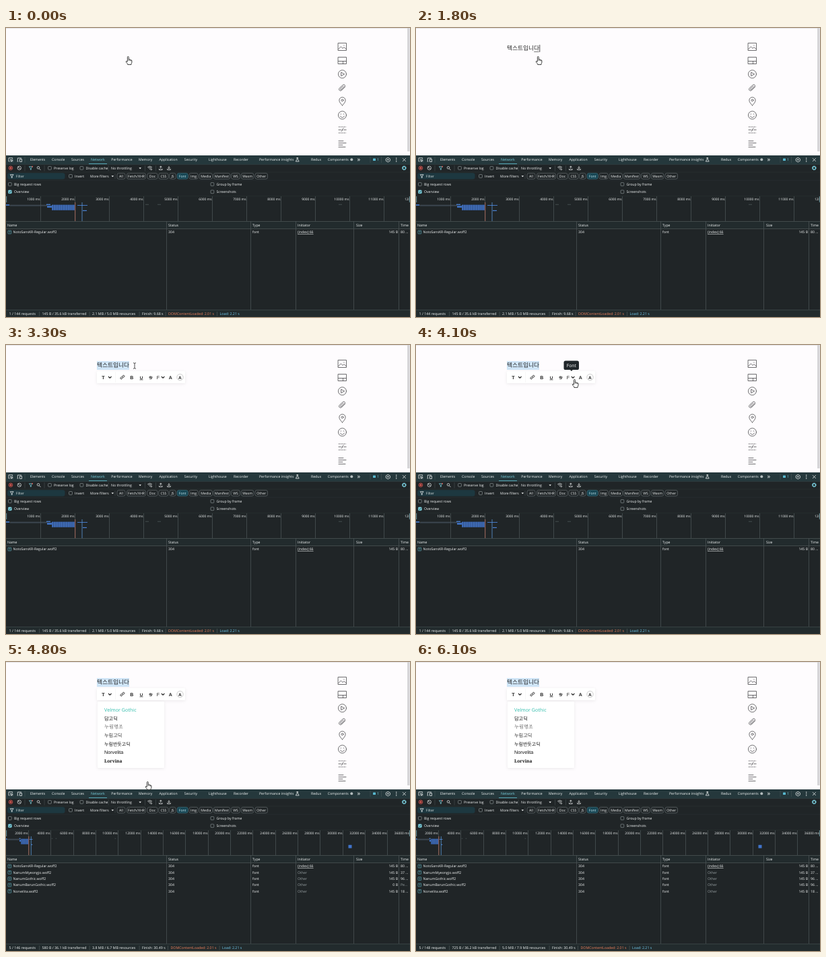
These frames come from a looping animation (600x431 px, 7 s). An HTML page:

```html
<!DOCTYPE html>
<html lang="ko">
<head>
<meta charset="utf-8">
<title>Font menu and network panel</title>
<style>
html, body { margin: 0; width: 100%; height: 100%; overflow: hidden; background: #fefcfe; }
svg { display: block; width: 100vw; height: 100vh; }
text { font-family: "Open Sans", "Noto Sans", sans-serif; font-size: 5.2px; fill: #f3f6f6; text-rendering: geometricPrecision; white-space: pre; }
.kr { font-family: "Noto Sans CJK KR", "Noto Sans CJK", sans-serif; }
.krs { font-family: "Noto Serif CJK KR", "Noto Sans CJK KR", serif; }
.arial { font-family: "Liberation Sans", sans-serif; }
.serif { font-family: "Noto Serif", serif; }
.card { filter: drop-shadow(0 1px 2px rgba(0, 0, 0, .08)); }
</style>
</head>
<body>
<svg id="stage" viewBox="0 0 600 431" preserveAspectRatio="none"></svg>
<script>
const NS = 'http://www.w3.org/2000/svg';
const stage = document.getElementById('stage');

function add(parent, tag, attrs, content) {
  const el = document.createElementNS(NS, tag);
  for (const k in attrs) el.setAttribute(k, attrs[k]);
  if (content !== undefined) el.textContent = content;
  parent.appendChild(el);
  return el;
}
const group = (p = stage, attrs = {}) => add(p, 'g', attrs);
const rect = (p, x, y, width, height, fill, more) =>
  add(p, 'rect', { x, y, width, height, fill, ...more });
const text = (p, x, y, s, more) => add(p, 'text', { x, y, ...more }, s);
const line = (p, d, stroke, w = 0.8, more) =>
  add(p, 'path', { d, stroke, 'stroke-width': w, fill: 'none', ...more });
const circle = (p, cx, cy, r, more) => add(p, 'circle', { cx, cy, r, fill: 'none', ...more });
const show = (el, on) => el.setAttribute('visibility', on ? 'visible' : 'hidden');

const INK = '#f3f6f6', DIM = '#98a1a3', TEAL = '#7cd3e2', RULE = '#495254', GRAY = '#545457';

// Editor page
rect(stage, 0, 0, 600, 190, '#fefcfe');
rect(stage, 0, 0, 596, 1, '#e6e4e7');
rect(stage, 596, 0, 4, 184, '#f1f0f2');
rect(stage, 596, 0, 3.4, 184, '#d6d5d8');

const side = group(stage, { stroke: GRAY, 'stroke-width': 0.85, fill: 'none', 'stroke-linejoin': 'round', 'stroke-linecap': 'round' });
[
  'M493.5 22.5H505.5V33.5H493.5ZM493.8 31.5L497.4 27.8L500 30.4L502 28.6L505.2 31.5M501.7 25.7h.5',
  'M493.5 43.5H505.5V53.5H493.5ZM493.5 49.5H505.5M500.5 49.5V53.5',
  'M498 66.2L502.6 68.8L498 71.4Z',
  'M503.8 87.6L498.4 93C496.4 95 493.1 92 495.2 89.8L500.5 84.8C502 83.4 504.6 85.5 503 87.3L498.2 91.8C497.2 92.7 495.9 91.5 496.8 90.5L501.2 86.4',
  'M499.5 115.6C496.2 111.8 494.9 110 494.9 107.8A4.6 4.6 0 0 1 504.1 107.8C504.1 110 502.8 111.8 499.5 115.6Z',
  'M496.7 131.5C497.7 134.2 501.3 134.2 502.3 131.5M497.3 128.2v.4M501.7 128.2v.4',
  'M494 151.9H497.4M501.8 151.9H505.2M498 154.2L500.2 151.9H498.8L501.4 149.4',
  'M494 168.5H501M494 171.5H505M494 174.5H500M494 177.5H504'
].forEach(d => add(side, 'path', { d }));
circle(side, 499.5, 68.8, 6);
circle(side, 499.5, 107.8, 1.5);
circle(side, 499.5, 130, 6);
line(side, 'M494 147.5H505.5M494 156.5H505.5', GRAY, 0.9, { 'stroke-dasharray': '1.6 1.2', 'stroke-linecap': 'butt' });

// Typed line
const selection = rect(stage, 135, 24, 0, 13, '#cfe5f7');
const typed = text(stage, 135, 33.4, '', { class: 'kr', style: 'font-size:8.7px;fill:#222' });
const under = rect(stage, 0, 35.2, 7.4, 0.7, '#444');
const caret = rect(stage, 0, 25, 0.8, 10.8, '#222');

// Format bar
const bar = group();
rect(bar, 135, 39, 131, 18, '#fff', { rx: 1.5, class: 'card' });
rect(bar, 162.3, 40, 0.5, 16, '#eeeef0');
const mark = (x, s, more = '') => text(bar, x, 50.5, s, {
  'text-anchor': 'middle', class: 'arial', style: 'font-size:7px;font-weight:700;fill:#222;' + more
});
mark(144.5, 'T');
mark(186.8, 'B');
mark(201, 'U', 'font-size:6.2px');
mark(215, 'S', 'font-size:6.4px');
mark(226, 'F', 'font-weight:400');
mark(244.2, 'A');
mark(258.5, 'A', 'font-size:6.6px');
circle(bar, 258.5, 48.1, 4.7, { stroke: '#999', 'stroke-width': 0.5 });
line(bar, 'M152 47L154.3 49.2L156.6 47M230.8 47L233.1 49.2L235.4 47', '#222', 1.1);
line(bar, 'M198.5 51.9H203.5M212 48.1H218', '#222', 0.7);
line(bar, 'M172.4 47L173.8 45.5A1.3 1.3 0 0 1 175.6 47.3L174.2 48.8M173.4 49L172 50.5A1.3 1.3 0 0 1 170.2 48.7L171.6 47.2M171.9 49L173.9 47', '#222', 1);

const tip = group();
rect(tip, 219.5, 23.6, 22.5, 13.4, '#20262a', { rx: 2.6 });
add(tip, 'path', { d: 'M228.8 36.8H233L230.9 39Z', fill: '#20262a' });
text(tip, 230.8, 32.6, 'Font', { 'text-anchor': 'middle', style: 'font-size:6.8px;fill:#fff' });

const menu = group();
rect(menu, 136, 59, 99, 99, '#fff', { rx: 1.5, class: 'card' });
[
  ['Velmor Gothic', '', 'font-size:7.2px;font-weight:500;fill:#2fbcab'],
  ['담고딕', 'kr', 'font-size:7.2px;font-weight:500'],
  ['누림명조', 'krs', 'font-size:7.2px;fill:#444'],
  ['누림고딕', 'kr', 'font-size:7.2px;fill:#333'],
  ['누림반듯고딕', 'kr', 'font-size:7px;font-weight:500'],
  ['Norvelita', 'arial', 'font-size:7.2px'],
  ['Lorvina', 'serif', 'font-size:6.6px;font-weight:600']
].forEach(([s, c, style], i) => text(menu, 146, 74.3 + i * 12.55, s, { class: c, style: 'fill:#111;' + style }));

// Network panel
rect(stage, 0, 190, 600, 241, '#202527');
rect(stage, 0, 190, 600, 13, '#25383c');
rect(stage, 0, 203, 600, 0.6, '#36464a');

const panel = group();
const tabs = {
  Elements: 36, Console: 68, Sources: 97, Network: 126, Performance: 156.3, Memory: 197, Application: 227.5,
  Security: 264.8, Lighthouse: 301, Recorder: 338, 'Performance insights': 376, Redux: 453, Components: 477.7
};
for (const s in tabs) text(panel, tabs[s], 198.3, s, s === 'Network' ? { style: `fill:${TEAL}` } : {});
rect(panel, 123, 202, 27, 1, '#56a9b7');
circle(panel, 513.3, 196.3, 2, { style: 'fill:#b4bdbe' });
text(panel, 521.5, 199.2, '»', { style: 'font-size:9.5px' });
rect(panel, 545, 194.6, 4, 3.4, '#58b8cf', { rx: 0.5 });
text(panel, 551, 198.2, '1', { style: `fill:${TEAL}` });

const icon = (d, color = INK, w = 0.75) => line(panel, d, color, w);
icon('M5.5 199H4V193.8H9.6V195.4M6.6 196L10.3 197.3L8.6 198L10 199.5M6.6 196L7.7 199.6L8.6 198');
icon('M18.5 199H16.5M17.3 198.5V194H23M20.5 195.5H23.5V199.4H20.5Z');
icon('M431.5 193.6H434M432.1 193.6V196L430.3 199H435.2L433.4 196V193.6');
icon('M567.3 193.3L570.3 195V198.2L567.3 199.9L564.3 198.2V195Z');
circle(panel, 567.3, 196.6, 1, { style: `fill:${INK}` });
[194.2, 196.6, 199].forEach(y => circle(panel, 579.7, y, 0.7, { style: `fill:${INK}` }));
icon('M589 194.2L593.8 199M593.8 194.2L589 199');
icon('M28 192V201M541 192V201M557.5 192V201M28 205V213.5M57 205V213.5M152.2 205V213.5M206.5 205V213.5M222.5 205V213.5M162 217V225', '#4c595b', 0.5);

circle(panel, 7, 208.8, 2.8, { stroke: '#ee5a52', 'stroke-width': 0.8 });
rect(panel, 5.7, 207.5, 2.6, 2.6, '#ee5a52');
circle(panel, 19.8, 208.8, 2.7, { stroke: INK, 'stroke-width': 0.7 });
icon('M17.9 206.9L21.7 210.7');
const funnel = (x, y, c) => icon(`M${x - 2.4} ${y - 2.2}H${x + 2.4}L${x + .5} ${y + .3}V${y + 2.4}H${x - .5}V${y + .3}Z`, c);
funnel(36.8, 208.9, TEAL);
circle(panel, 39.2, 206.6, 0.9, { style: 'fill:#ee5a52' });
circle(panel, 48, 208.3, 1.8, { stroke: INK, 'stroke-width': 0.7 });
icon('M49.3 209.7L51.5 211.9');

function check(x, y, s, on) {
  rect(panel, x, y - 2.4, 4.8, 4.8, on ? TEAL : 'none', { rx: 0.9, stroke: on ? TEAL : DIM, 'stroke-width': 0.6 });
  if (on) icon(`M${x + 1} ${y}L${x + 2.1} ${y + 1.2}L${x + 4} ${y - 1.2}`, '#202526', 0.8);
  text(panel, x + 8.4, y + 2, s);
}
check(62.6, 208.9, 'Preserve log');
check(110, 208.9, 'Disable cache');
check(93.6, 220.9, 'Invert');
check(3.5, 233, 'Big request rows');
check(304, 233, 'Group by frame');
check(3.5, 244.3, 'Overview', true);
check(304, 244.3, 'Screenshots');

const down = (x, y) => add(panel, 'path', { d: `M${x - 1.8} ${y - 1}h3.6l-1.8 2z`, fill: INK });
text(panel, 156, 210.9, 'No throttling');
down(199.2, 209.2);
text(panel, 125, 222.9, 'More filters');
down(158.3, 221.2);
icon('M210.3 207.7Q213.6 204.9 216.9 207.7M211.6 209.1Q213.6 207.4 215.6 209.1M213.1 210.6h1');
circle(panel, 215.7, 210.8, 1, { stroke: INK, 'stroke-width': 0.6 });
icon('M229.8 210V206M228.2 207.5L229.8 205.9L231.4 207.5M227.5 209.8V211.5H232.1V209.8');
icon('M242 206V209.8M240.4 208.3L242 209.9L243.6 208.3M239.7 209.8V211.5H244.3V209.8');
circle(panel, 591.3, 208.8, 2.2, { stroke: TEAL, 'stroke-width': 1.2 });
circle(panel, 591.3, 208.8, 3, { stroke: TEAL, 'stroke-width': 0.9, 'stroke-dasharray': '1.2 1.156' });

rect(panel, 2, 216.2, 85.5, 9.4, '#1d3840', { rx: 3 });
funnel(8.7, 220.9, INK);
text(panel, 14.8, 222.9, 'Filter', { style: 'fill:#d5dddd' });
[
  ['All', 165, 177], ['Fetch/XHR', 179.5, 207.5], ['Doc', 210, 225], ['CSS', 226.8, 241],
  ['JS', 242.8, 252.2], ['Font', 254.2, 270.2], ['Img', 272, 285.2], ['Media', 287.2, 306.5],
  ['Manifest', 308.3, 332.7], ['WS', 334.6, 347.4], ['Wasm', 349.4, 367.8], ['Other', 370, 388.5]
].forEach(([s, a, b]) => {
  const on = s === 'Font';
  rect(panel, a, 216.6, b - a, 8.6, on ? '#174654' : 'none', { rx: 2.4, stroke: on ? '#4a7f8c' : '#7d8789', 'stroke-width': 0.5 });
  text(panel, (a + b) / 2, 222.8, s, { 'text-anchor': 'middle', style: on ? 'fill:#cdeef6' : '' });
});
icon('M0 215H600M0 227.2H600M0 250.7H600', '#2d3537', 0.5);

// Timeline; bars are drawn once per time scale
function timeline(step, pitch, squeeze) {
  const g = group();
  for (let i = 1; i * pitch < 602; i++) {
    const x = Math.floor(i * pitch) + 0.5;
    line(g, `M${x} 251V288`, RULE);
    text(g, Math.min(x, 600) - 1, 256.8, `${i * step} ms`, { 'text-anchor': 'end', style: 'font-size:4.9px' });
  }
  const bars = group(g, { transform: `scale(${squeeze} 1)` });
  rect(bars, 0, 263.2, 5, 1.6, '#4a82d6');
  rect(bars, 5, 263.8, 56, 0.8, '#4f5c6a');
  rect(bars, 6, 265.2, 56, 0.6, '#3d4954');
  rect(bars, 60, 262.6, 6, 1.4, '#4a7fd0');
  rect(bars, 61, 265, 7, 3, '#3d6cb8');
  rect(bars, 68, 263.6, 34.5, 8.2, '#2c4a7e');
  for (let x = 68.5; x < 102; x += 2.6) rect(bars, x, 263.8, 1.5, 7.8, '#4677c8');
  rect(bars, 106, 264, 15, 0.9, '#4a82d6');
  rect(bars, 114, 271.8, 6, 1.2, '#4a82d6');
  [207, 225, 494].forEach(x => rect(bars, x, 262.8, 5, 0.8, '#4b5659'));
  rect(g, 102.4 * squeeze, 260, 0.8, 28, '#b9705f');
  rect(g, 112.6 * squeeze, 260, 0.8, 28, '#5b97d4');
  return g;
}
const early = timeline(1000, 51, 1);
text(early, 592, 256.8, '120', { style: 'font-size:4.9px' });
const late = timeline(2000, 33.35, 0.327);
rect(late, 508.5, 272.8, 5, 4.8, '#4174cb');
rect(stage, 0, 251, 1.2, 9, '#5d8188');
rect(stage, 598.8, 251, 1.2, 9, '#5d8188');

// Request table
const table = group();
rect(table, 0, 288, 600, 11.5, '#222b2d');
line(table, 'M0 288.5H600M0 299.5H600', RULE);
line(table, 'M238.5 288V420M363.5 288V420M430.5 288V420M516.5 288V420M583.5 288V420', RULE);
Object.entries({ Name: 2, Status: 241, Type: 366, Initiator: 433, Size: 520, Time: 586 })
  .forEach(([s, x]) => text(table, x, 296, s));

const rows = [
  ['NotoSansKR-Regular', 80], ['NanumMyeongjo', 37], ['NanumGothic', 96], ['NanumBarunGothic', 96], ['Norvelita', 18]
].map(([name, ms], i) => {
  const g = group(), y = 306.4 + i * 9.33;
  rect(g, 3, y - 4.3, 4.8, 4.8, 'none', { rx: 0.6, stroke: '#5fb6c4', 'stroke-width': 0.6 });
  text(g, 5.4, y - 0.3, 'T', { 'text-anchor': 'middle', style: `font-size:4.2px;fill:${TEAL}` });
  text(g, 10.5, y, name + '.woff2');
  text(g, 241, y, '304');
  text(g, 366, y, 'font');
  text(g, 433, y, i ? 'Other' : '(index):66', { style: i ? `fill:${DIM}` : 'text-decoration:underline' });
  const size = text(g, 582, y, '145 B', { 'text-anchor': 'end' });
  const time = text(g, 586, y, ms + ' …');
  return { g, size, time };
});

// Status bar
rect(stage, 0, 420, 600, 11, '#222b2d');
rect(stage, 0, 420, 600, 0.8, '#3b4648');
function status(parts, xs) {
  const g = group(), colors = [INK, INK, INK, INK, '#f0805c', '#74cdf2'];
  parts.concat('DOMContentLoaded: 2.01 s', 'Load: 2.21 s').forEach((s, i) => {
    text(g, xs[i], 428.2, s, { style: `font-size:5.3px;fill:${colors[i]}` });
    if (i) rect(g, xs[i] - 4.2, 423, 0.5, 6.5, '#5a6667');
  });
  return g;
}
const wide = [4.5, 53.5, 128, 202, 244.5, 321];
const totals = [
  status(['1 / 144 requests', '145 B / 35.6 kB transferred', '2.1 MB / 5.0 MB resources', 'Finish: 9.68 s'], [4.5, 53.5, 128, 202, 241, 317.5]),
  status(['5 / 146 requests', '580 B / 36.1 kB transferred', '3.8 MB / 6.7 MB resources', 'Finish: 30.49 s'], wide),
  status(['5 / 148 requests', '725 B / 36.2 kB transferred', '5.0 MB / 7.9 MB resources', 'Finish: 30.49 s'], wide)
];

// Pointers
const hand = group();
add(hand, 'path', {
  d: 'M-1 6.6V.9A.95.95 0 0 1 .9.9V4.4Q1.8 3.6 2.6 4.7Q3.6 4.2 4.1 5.2Q5.4 5 5.5 6.3V8.5Q5.4 9.7 4.6 10.7V12H-.7V11Q-2.6 9 -3.3 7.4Q-3 5.9 -1 7.6Z',
  fill: '#fff', stroke: '#111', 'stroke-width': 0.8, 'stroke-linejoin': 'round'
});
line(hand, 'M.9 4.4V6.4M2.6 4.7V6.6M4.1 5.2V6.8', '#111', 0.6);
const beam = group();
line(beam, 'M-2 -4.3Q0 -4.3 0 -3.3Q0 -4.3 2 -4.3M0 -3.4V3.4M-2 4.3Q0 4.3 0 3.3Q0 4.3 2 4.3', '#222', 0.8);

// [ms, text, composing]
const typing = [
  [0, ''], [200, 'ㅌ', 1], [400, '테', 1], [500, '텍', 1], [700, '텍ㅅ', 1], [800, '텍스', 1], [900, '텍슽', 1],
  [1000, '텍스트', 1], [1100, '텍스틍', 1], [1200, '텍스트이', 1], [1300, '텍스트입', 1], [1400, '텍스트입ㄴ', 1],
  [1500, '텍스트입니', 1], [1600, '텍스트입니다', 1], [2400, '텍스트입니다']
];
// [ms, x, y, pointer]
const pointer = [
  [0, 181.4, 42.6, hand], [2400, 160, 36, beam], [2500, 135.5, 30.5, beam],
  [2800, 146, 30.5, beam], [2900, 163, 30.7, beam], [3000, 181, 31, beam], [3100, 191, 31, beam],
  [3400, 197, 35, beam], [3500, 209, 41, hand], [3600, 222, 46, hand], [3700, 231, 50, hand],
  [3800, 235.5, 51.4, hand], [4700, 224, 112, hand], [4800, 210.4, 178.6, hand], [4900, 0, 0, null]
];
const at = (steps, t) => steps.filter(s => s[0] <= t).pop();

function draw(t) {
  const [, word, composing] = at(typing, t);
  const [, x, y, kind] = at(pointer, t);
  const edge = 135 + word.length * 8;
  typed.textContent = word;
  show(under, composing);
  under.setAttribute('x', edge - 7.8);
  show(caret, t >= 100 && t < 2800);
  caret.setAttribute('x', t < 2500 ? edge + 0.4 : 134.8);

  const cells = t < 2800 ? 0 : t < 3100 ? Math.round((x - 135) / 8) : 6;
  selection.setAttribute('width', Math.min(cells, 6) * 8);
  show(bar, t >= 3300);
  show(tip, t >= 4000 && t < 4600);
  show(menu, t >= 4600);
  for (const p of [hand, beam]) {
    show(p, p === kind);
    p.setAttribute('transform', `translate(${x} ${y})`);
  }

  const phase = t < 4700 ? 0 : t < 4900 ? 1 : 2;
  show(early, phase === 0);
  show(late, phase > 0);
  totals.forEach((g, i) => show(g, i === phase));
  rows.forEach((r, i) => show(r.g, i === 0 || phase > 0));
  rows[3].size.textContent = phase === 1 ? '0 B' : '145 B';
  rows[3].time.textContent = phase === 1 ? 'Pe…' : '96 …';
  rows[3].time.style.fill = phase === 1 ? DIM : INK;
}

const start = performance.now();
function tick() {
  const t = (performance.now() - start) % 7000;
  draw(Math.floor(t / 100) * 100);
  requestAnimationFrame(tick);
}
tick();
</script>
</body>
</html>
```
